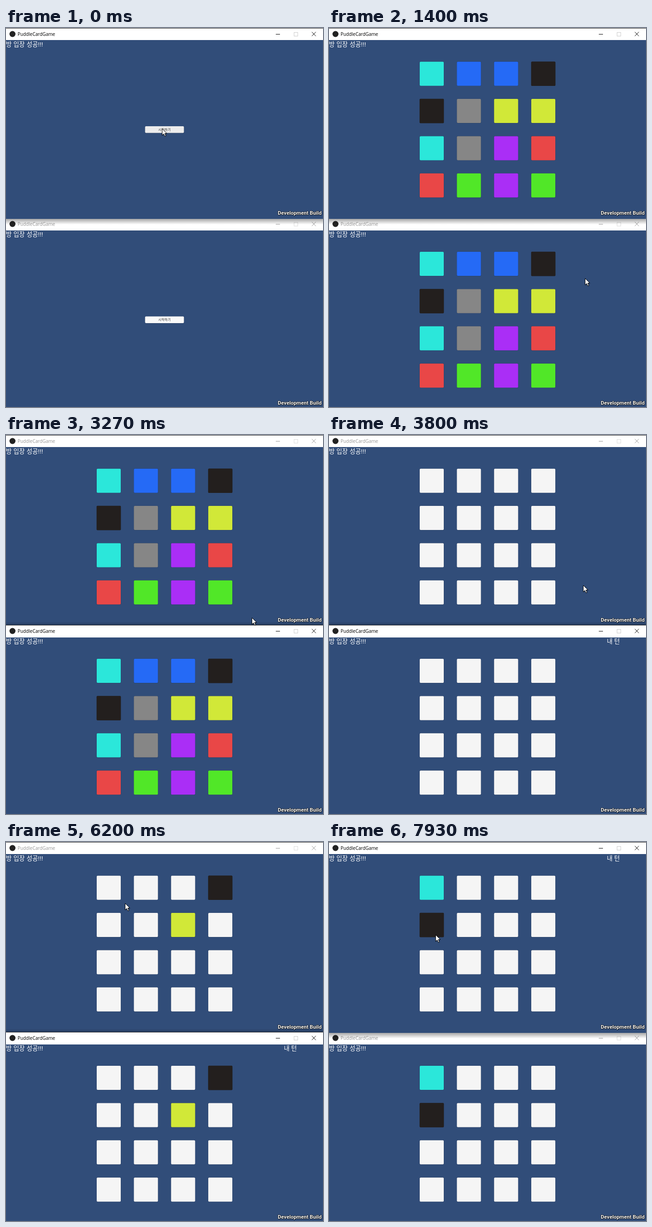
An HTML page with a canvas for the animation above (8 s loop, 685 by 818 pixels).

```html
<!DOCTYPE html>
<html lang="ko">
<head>
<meta charset="utf-8">
<title>Card game</title>
<style>
html, body { margin: 0; width: 100%; height: 100%; overflow: hidden; background: #314d79; }
canvas { display: block; }
</style>
</head>
<body>
<canvas id="stage" width="685" height="818"></canvas>
<script>
const ctx = document.getElementById('stage').getContext('2d');
const LOOP = 8000, STEP = 1000 / 15, W = 685;
const KOREAN = '"Liberation Sans", "Noto Sans CJK KR", "Noto Sans CJK", sans-serif';
const BLUE = '#314d79', EDGE = 'rgba(20,30,50,.4)';
const COLORS = {
  c: '#2be7da', b: '#256af6', k: '#231f1e', g: '#868686',
  y: '#d1e838', p: '#aa2ef6', r: '#e94747', e: '#51e728', w: '#f5f5f5'
};
const BOARD = 'cbbkkgyycgprrepe';

// Times at which the game state changes
const PRESS = 130, DEAL = 330, LOWER_FOCUS = 1730, HIDE = 3330;
const PICK_1 = 4330, PICK_2 = 5070, TURN = 6530, UPPER_FOCUS = 6730;
const PICK_3 = 7000, PICK_4 = 7600;

// The pointer rests between moves: start, end, goal x, goal y
const HOME = [337, 217];
const MOVES = [
  [DEAL, 930, 427, 624],
  [930, 1130, 553, 540],
  [2870, 3270, 531, 394],
  [3400, 3800, 549, 324],
  [3800, 4270, 460, 511],
  [PICK_1, 4870, 391, 593],
  [5200, 5800, 357, 263],
  [5870, 6330, 235, 102],
  [PICK_3, 7400, 230, 200]
];

function pointerAt(t) {
  let [x, y] = HOME;
  for (const [from, to, goalX, goalY] of MOVES) {
    const u = Math.min(1, Math.max(0, (t - from) / (to - from)));
    const k = u * u * (3 - 2 * u);
    x += (goalX - x) * k;
    y += (goalY - y) * k;
  }
  return [Math.round(x), Math.round(y)];
}

function rect(x, y, w, h, color) {
  ctx.fillStyle = color;
  ctx.fillRect(x, y, w, h);
}

function panel(x, y, w, h, color) {
  ctx.fillStyle = color;
  ctx.beginPath();
  ctx.roundRect(x, y, w, h, 2);
  ctx.fill();
}

function text(str, x, y, font, color, align = 'left') {
  ctx.font = font;
  ctx.fillStyle = color;
  ctx.textAlign = align;
  ctx.fillText(str, x, y);
}

function line(x0, y0, x1, y1, color) {
  ctx.strokeStyle = color;
  ctx.lineWidth = 1;
  ctx.beginPath();
  ctx.moveTo(x0, y0);
  ctx.lineTo(x1, y1);
  ctx.stroke();
}

function titleBar(active) {
  const ink = active ? '#000' : '#999';
  ctx.fillStyle = '#222';
  ctx.beginPath();
  ctx.arc(14, 13, 6.5, 0, Math.PI * 2);
  ctx.fill();
  text('PuddleCardGame', 25, 17, '9.9px "Open Sans", "Noto Sans", sans-serif', ink);
  line(583, 13.5, 592, 13.5, ink);
  ctx.strokeStyle = active ? '#ccc' : '#ddd';
  ctx.strokeRect(622.5, 9.5, 8, 8);
  line(661, 8.5, 669.5, 17.5, ink);
  line(669.5, 8.5, 661, 17.5, ink);
}

function buildLabel() {
  const font = 'bold 11.2px Roboto, "Open Sans", sans-serif';
  for (const [dx, dy] of [[-1, 0], [1, 0], [0, -1], [0, 1], [1, 1]])
    text('Development Build', 682 + dx, 403 + dy, font, 'rgba(0,0,0,.6)', 'right');
  text('Development Build', 682, 403, font, '#fff', 'right');
}

function startButton(color) {
  panel(300, 212, 85, 15.2, EDGE);
  panel(300.5, 212, 84, 14.5, color);
  text('시작하기', 342.5, 221.8, '7.3px ' + KOREAN, '#323232', 'center');
}

function isOpen(i, t) {
  if (t < HIDE) return true;
  if (t < TURN) return (i === 3 && t >= PICK_1) || (i === 6 && t >= PICK_2);
  return (i === 0 && t >= PICK_3) || (i === 4 && t >= PICK_4);
}

function cards(t) {
  for (let i = 0; i < 16; i++) {
    const x = 196 + (i % 4) * 80.35, y = 72.7 + (i >> 2) * 80.35;
    const kind = isOpen(i, t) ? BOARD[i] : 'w';
    panel(x - .3, y - .3, 52.6, 52.7, kind === 'k' ? COLORS.k : EDGE);
    panel(x, y, 52, 52, COLORS[kind]);
  }
}

function gameWindow(top, active, myTurn, hovered, t) {
  ctx.save();
  ctx.translate(0, top);
  rect(0, 0, W, 412, BLUE);
  // The lower window sits half a pixel off the grid
  rect(0, 1, W, top ? 26 : 25, '#fff');
  if (!top || active) rect(0, 0, W, 1, '#2b2b2b');
  titleBar(active);
  text('방 입장 성공!!!', 0, 39.7, '13.4px ' + KOREAN, '#fff');
  if (myTurn) text('내 턴', 600.5, 39.7, '13.2px ' + KOREAN, '#fff');
  buildLabel();
  if (top) ctx.translate(0, .4);
  if (t >= DEAL) cards(t);
  else startButton(!hovered ? '#f9f9f9' : t < PRESS ? '#ececec' : '#c8c8c8');
  ctx.restore();
}

function shade(y0, y1, from, to) {
  const g = ctx.createLinearGradient(0, y0, 0, y1);
  g.addColorStop(0, `rgba(0,0,0,${from})`);
  g.addColorStop(1, `rgba(0,0,0,${to})`);
  rect(0, y0, W, y1 - y0, g);
}

function pointer(x, y) {
  ctx.save();
  ctx.translate(x + .5, y + .5);
  ctx.scale(.88, .88);
  const shape = new Path2D('M0 0V16L3.8 12.4L6.4 18.2L9 17L6.5 11.4H11.4Z');
  ctx.shadowColor = 'rgba(0,0,0,.35)';
  ctx.shadowBlur = 2;
  ctx.shadowOffsetX = ctx.shadowOffsetY = 1;
  ctx.fillStyle = '#fff';
  ctx.fill(shape);
  ctx.shadowColor = 'transparent';
  ctx.strokeStyle = '#000';
  ctx.lineWidth = 1.1;
  ctx.stroke(shape);
  ctx.restore();
}

function draw(t) {
  const lowerActive = t >= LOWER_FOCUS && t < UPPER_FOCUS;
  gameWindow(0, !lowerActive, t >= TURN, true, t);
  gameWindow(410, lowerActive, t >= HIDE && t < TURN, false, t);
  if (lowerActive) {
    shade(403, 410, 0, .22);
  } else {
    rect(0, 410, W, 2, BLUE);
    shade(412, 424, .35, 0);
  }
  pointer(...pointerAt(t));
}

const start = performance.now();
function tick(now) {
  const t = Math.max(0, now - start) % LOOP;
  // The screen refreshes fifteen times a second
  draw(Math.floor((t + 4) / STEP) * STEP % LOOP + 4);
  requestAnimationFrame(tick);
}
draw(0);
requestAnimationFrame(tick);
</script>
</body>
</html>
```
